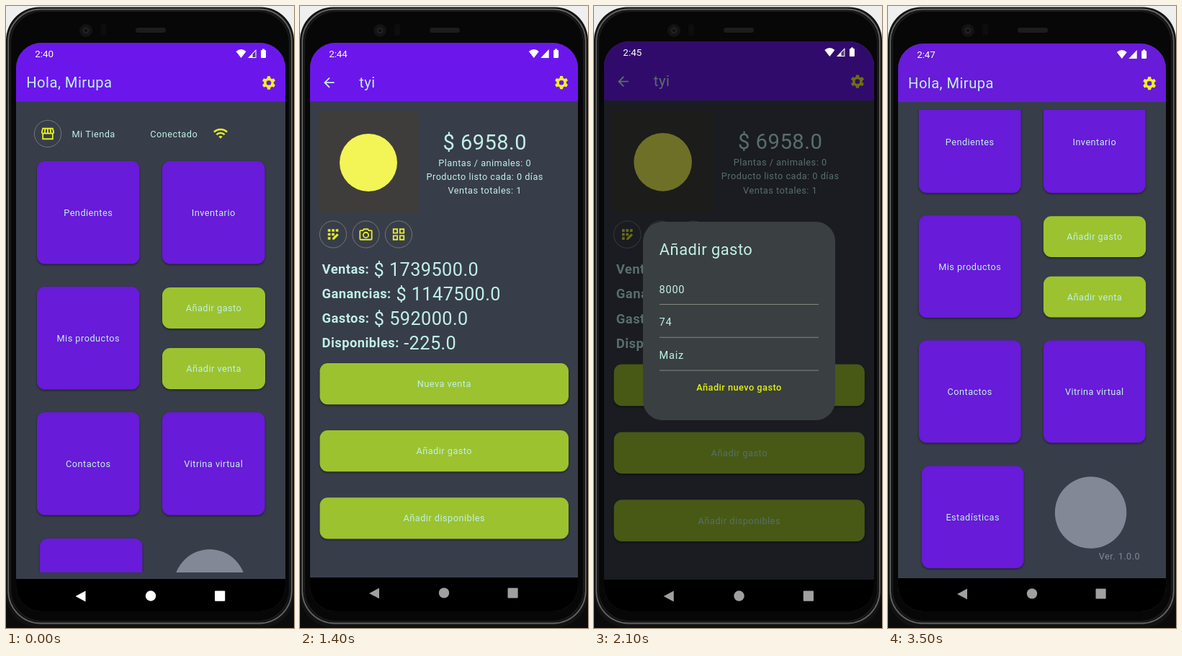
An HTML page with a canvas for the animation above (4.2 s loop, 400x862 px).

```html
<!DOCTYPE html>
<html lang="es">
<head>
<meta charset="utf-8">
<title>App de granja</title>
<style>
  html, body { margin: 0; width: 100%; height: 100%; overflow: hidden; background: #efefef; }
  canvas { display: block; width: 400px; height: 862px; }
</style>
</head>
<body>
<canvas id="stage"></canvas>
<script>
const W = 400, H = 862, HOLD = 700;
const canvas = document.getElementById('stage');
const ctx = canvas.getContext('2d');
const ratio = window.devicePixelRatio || 1;
canvas.width = W * ratio;
canvas.height = H * ratio;

const BG = '#383d4a', PURPLE = '#681bd8', BAR = '#6b17ec', GREEN = '#9cc22f', FAB = '#a3cb34';
const MINT = '#c0f1e6', YELLOW = '#e6ee22', INK = '#1d1f14', RING = '#78776d', DIALOG = '#3a3f42', FADED = '#828896';

// Icons on a 24-unit grid
const ICONS = {
  wifi: 'M1 9l2 2c4.97-4.97 13.03-4.97 18 0l2-2C16.93 2.93 7.08 2.93 1 9zm8 8l3 3 3-3c-1.65-1.66-4.34-1.66-6 0zm-4-4l2 2c2.76-2.76 7.24-2.76 10 0l2-2C15.14 9.14 8.87 9.14 5 13z',
  check: 'M9 16.17L4.83 12l-1.42 1.41L9 19 21 7l-1.41-1.41z',
  back: 'M20 11H7.83l5.59-5.59L12 4l-8 8 8 8 1.41-1.41L7.83 13H20z',
  plus: 'M19 13h-6v6h-2v-6H5v-2h6V5h2v6h6z',
  phone: 'M6.6 10.8c1.4 2.8 3.8 5.1 6.6 6.6l2.2-2.2c.3-.3.7-.4 1-.2 1.1.4 2.3.6 3.6.6a1 1 0 0 1 1 1V20a1 1 0 0 1-1 1A17 17 0 0 1 3 4a1 1 0 0 1 1-1h3.5a1 1 0 0 1 1 1c0 1.2.2 2.4.6 3.6.1.3 0 .7-.3 1z',
  smallPlus: 'M17 2h2v3h3v2h-3v3h-2V7h-3V5h3z',
  edit: 'M3 17.25V21h3.75L17.8 9.94l-3.75-3.75zM20.7 7a1 1 0 0 0 0-1.4l-2.3-2.3a1 1 0 0 0-1.4 0l-1.9 1.8 3.75 3.75z',
  trash: 'M6 19a2 2 0 0 0 2 2h8a2 2 0 0 0 2-2V7H6zM19 4h-3.5l-1-1h-5l-1 1H5v2h14z',
  register: 'M4 4h4v4H4zm6 0h4v4h-4zm6 0h4v4h-4zM4 10h4v4H4zm6 0h4v4h-4zM4 16h4v4H4zM11 17.5V20h2.5l7-7-2.5-2.5z'
};
const LINE_ICONS = {
  store: 'M4.5 4h15L21 9.5a2.2 2.2 0 0 1-4.5 0a2.2 2.2 0 0 1-4.5 0a2.2 2.2 0 0 1-4.5 0a2.2 2.2 0 0 1-4.5 0zM12 4v5.5M8.2 4l-.7 5.5M15.8 4l.7 5.5M4.5 12v8h15v-8',
  camera: 'M4 6h3.5L9 4h6l1.5 2H20a1 1 0 0 1 1 1v12a1 1 0 0 1-1 1H4a1 1 0 0 1-1-1V7a1 1 0 0 1 1-1zM16 13a4 4 0 1 1-8 0a4 4 0 1 1 8 0z',
  squares: 'M4 4h6v6H4zm10 0h6v6h-6zM4 14h6v6H4zm10 0h6v6h-6z'
};

function box(x, y, w, h, r, fill, shadow) {
  ctx.save();
  if (shadow) {
    ctx.shadowColor = 'rgba(0,0,0,.45)';
    ctx.shadowBlur = 3 * ratio;
    ctx.shadowOffsetY = 1.5 * ratio;
  }
  ctx.fillStyle = fill;
  ctx.beginPath();
  ctx.roundRect(x, y, w, h, r);
  ctx.fill();
  ctx.restore();
}

function outline(x, y, w, h, r, color, width) {
  ctx.strokeStyle = color;
  ctx.lineWidth = width;
  ctx.beginPath();
  ctx.roundRect(x, y, w, h, r);
  ctx.stroke();
}

function disc(x, y, r, fill) {
  ctx.fillStyle = fill;
  ctx.beginPath();
  ctx.arc(x, y, r, 0, 7);
  ctx.fill();
}

function poly(fill, ...points) {
  ctx.beginPath();
  points.forEach(([x, y]) => ctx.lineTo(x, y));
  ctx.closePath();
  ctx.fillStyle = fill;
  ctx.fill();
}

function text(str, x, y, { size = 12.74, color = MINT, weight = 400, align = 'left', gap = 0.48 } = {}) {
  ctx.font = `${weight} ${size}px Roboto, sans-serif`;
  ctx.letterSpacing = gap + 'px';
  ctx.textAlign = align;
  ctx.fillStyle = color;
  ctx.fillText(str, x, y);
}

const centered = (str, x, y, opts) => text(str, x, y, { ...opts, align: 'center' });

function icon(name, x, y, color, size = 21.8) {
  ctx.save();
  ctx.translate(x - size / 2, y - size / 2);
  ctx.scale(size / 24, size / 24);
  if (LINE_ICONS[name]) {
    ctx.strokeStyle = color;
    ctx.lineWidth = 2;
    ctx.stroke(new Path2D(LINE_ICONS[name]));
  } else {
    ctx.fillStyle = color;
    ctx.fill(new Path2D(ICONS[name]));
  }
  ctx.restore();
}

function gear(x, y) {
  ctx.beginPath();
  for (let i = 0; i < 6; i++) {
    const mid = (i - 1.5) * Math.PI / 3;
    for (const [turn, r] of [[-.36, 6.9], [-.21, 9.4], [.21, 9.4], [.36, 6.9]]) {
      ctx.lineTo(x + r * Math.cos(mid + turn), y + r * Math.sin(mid + turn));
    }
  }
  ctx.closePath();
  ctx.moveTo(x + 3.3, y);
  ctx.arc(x, y, 3.3, 0, Math.PI * 2, true);
  ctx.fillStyle = '#eff02a';
  ctx.fill('evenodd');
}

function ringIcon(name, x, y) {
  outline(x - 18.6, y - 18.6, 37.2, 37.2, 18.6, RING, 1);
  icon(name, x, y, YELLOW);
}

function button(label, x, y, w, h, fill) {
  box(x, y, w, h, 11, fill, true);
  centered(label, x + w / 2, y + h / 2 + 4.5);
}

function phone() {
  ctx.fillStyle = '#efefef';
  ctx.fillRect(0, 0, W, H);
  ctx.fillStyle = '#0b0b0b';
  ctx.fillRect(0, H / 2, W, H / 2);
  box(0, 1.5, 400, 860, 46, '#121212');
  outline(3.2, 4.5, 393.6, 851, 45, '#626262', 1.8);
  outline(6.5, 7.5, 387, 845, 43, '#1c1c1c', 1.5);
  box(7, 8, 386, 844, 43, '#070707');
  disc(111, 34, 9, '#131313');
  disc(111, 34, 4.5, '#212123');
  disc(111, 34, 2, '#0c0c0e');
  box(131, 25, 8, 16, 3, '#0d0d0d');
  box(180, 30, 42, 7, 3.5, '#1c1c1c');
}

function statusBar({ time, weak }) {
  const white = '#fff';
  text(time, 40.3, 71, { size: 13.4, color: white, gap: 0 });
  ctx.fillStyle = white;
  ctx.beginPath();
  ctx.moveTo(326.5, 72);
  ctx.lineTo(319.5, 63);
  ctx.quadraticCurveTo(326.5, 57, 333.5, 63);
  ctx.fill();
  poly(white, [336, 72], [347.5, 72], [347.5, 60]);
  if (weak) poly('rgba(60,40,110,.9)', [342.5, 71], [346.5, 71], [346.5, 62.5], [342.5, 66.8]);
  box(354, 61, 7, 11, 1, white);
  box(356, 59.5, 3, 2, 0, white);
}

function navBar(color) {
  poly(color, [96.5, 818], [110.5, 810.5], [110.5, 825.5]);
  disc(201, 817.5, 7.2, color);
  box(290, 810.5, 14.2, 14.2, 1, color);
}

function home(scroll) {
  ctx.save();
  ctx.beginPath();
  ctx.rect(14, 143, 374, 642);
  ctx.clip();
  ctx.translate(0, -scroll);
  ringIcon('store', 58, 177);
  text('Mi Tienda', 91.5, 181.5);
  text('Conectado', 200.3, 181.5);
  icon('wifi', 298, 176.5, YELLOW);
  const tile = (label, x, y) => button(label, x, y, 142.5, 142.5, PURPLE);
  tile('Pendientes', 43, 215);
  tile('Inventario', 217, 215);
  tile('Mis productos', 43, 389);
  button('Añadir gasto', 217, 390, 143, 57, GREEN);
  button('Añadir venta', 217, 474, 143, 57, GREEN);
  tile('Contactos', 43, 563);
  tile('Vitrina virtual', 217, 563);
  tile('Estadísticas', 47, 738);
  disc(283, 803, 50, FADED);
  text('Ver. 1.0.0', 294.3, 868.2, { color: FADED });
  ctx.restore();
}

function floatingButton() {
  box(319, 727, 54, 53.5, 15, FAB, true);
}

function tasks() {
  box(89, 84.5, 112, 44.5, [22.2, 0, 0, 22.2], '#e5e5c1');
  outline(89, 84.5, 224, 44.5, 22.2, RING, 1);
  poly(RING, [200.5, 84.5], [201.5, 84.5], [201.5, 129], [200.5, 129]);
  icon('check', 109, 107, INK, 16.4);
  text('Pendiente', 124, 111.5, { weight: 500, color: INK });
  text('Completado', 219.3, 111.5, { weight: 500 });
  ['Comprar concentrado perros', 'Arreglar espacio de patos'].forEach((task, i) => {
    const y = 204 + i * 53.3;
    text(task, 28.6, y + 5, { size: 14.56, gap: 0.78 });
    box(297, y - 19, 68, 38, 19, PURPLE);
    icon('check', 331, y + .5, YELLOW);
  });
  floatingButton();
  icon('plus', 346, 753, INK);
}

function product() {
  ctx.save();
  ctx.translate(14, 51);
  ctx.scale(374 / 372, 374 / 372);
  ctx.translate(-14, -51);
  box(25, 146, 141, 142, 9, '#3e3d3c');
  disc(95, 217, 40, '#f3f455');
  centered('$ 6958.0', 256.7, 198.5, { size: 29 });
  ['Plantas / animales: 0', 'Producto listo cada: 0 días', 'Ventas totales: 1']
    .forEach((line, i) => centered(line, 256.7, 221.5 + i * 19.2, { size: 12.68 }));
  ['register', 'camera', 'squares'].forEach((name, i) => ringIcon(name, 46 + i * 45.5, 316.5));
  [['Ventas:', '$ 1739500.0', 102.6], ['Ganancias:', '$ 1147500.0', 133.4],
   ['Gastos:', '$ 592000.0', 102.8], ['Disponibles:', '-225.0', 144.2]].forEach(([label, value, x], i) => {
    const y = 370.5 + i * 34;
    text(label, 30.6, y, { size: 18.3, weight: 700 });
    text(value, x, y + 3, { size: 25.3, gap: 0.42 });
  });
  ['Nueva venta', 'Añadir gasto', 'Añadir disponibles']
    .forEach((label, i) => button(label, 27.5, 495 + i * 93.1, 345.5, 57.2, GREEN));
  ctx.restore();
}

function contacts() {
  ['Nombre: Olmo Tardeza', 'Nota: Dueño de el granero', 'Ubicación: Boyaca, Colombia',
   'Celular: 100200300', 'Redes sociales: Tuvilor']
    .forEach((line, i) => text(line, 27.9, 161.4 + i * 19.5));
  floatingButton();
  icon('phone', 345, 754, INK, 20);
  icon('smallPlus', 346, 752, INK, 20);
}

function expenseDialog() {
  box(68, 299, 267, 275, 27, DIALOG);
  text('Añadir gasto', 90.8, 345, { size: 21.9 });
  ['8000', '74', 'Maiz'].forEach((value, i) => {
    const y = 397.5 + i * 45.8;
    text(value, 90.5, y, { size: 14.56, gap: 0.78 });
    box(91, y + 15.5, 221, 1, 0, '#83877f');
  });
  centered('Añadir nuevo gasto', 201.5, 533, { weight: 500, color: '#e2f200' });
}

function contactDialog() {
  box(53, 343, 296.5, 185, 26, DIALOG);
  text('Olmo Tardeza', 75.5, 371.5);
  [['phone', 'Llamar', 127, 127], ['edit', 'Editar', 201, 197], ['trash', 'Eliminar', 275, 271]]
    .forEach(([name, label, iconX, labelX]) => {
      icon(name, iconX, 422, YELLOW);
      centered(label, labelX + .3, 480, { weight: 500, color: '#dcea1c' });
    });
}

const GREET = 'Hola, Mirupa', WHITE = '#fff', GREY = '#a0a0a0';
const scenes = [
  { time: '2:40', left: 14, right: 388, top: 51, nav: 794, bar: BAR, title: GREET, gear: true, weak: true, navColor: WHITE, body: () => home(0) },
  { time: '2:42', left: 14, right: 388, top: 51, nav: 795, navColor: WHITE, body: tasks },
  { time: '2:44', left: 14, right: 386, top: 51, nav: 792, bar: BAR, title: 'tyi', back: true, gear: true, navColor: GREY, body: product },
  { time: '2:45', left: 14, right: 389, top: 49, nav: 795, bar: BAR, title: 'tyi', back: true, gear: true, weak: true, navColor: GREY, body: product, dialog: expenseDialog },
  { time: '2:46', left: 15, right: 387, top: 51, nav: 792, bar: BAR, title: 'Contactos', back: true, navColor: GREY, body: contacts, dialog: contactDialog },
  { time: '2:47', left: 14, right: 386, top: 52, nav: 793, bar: PURPLE, title: GREET, gear: true, navColor: GREY, body: () => home(98.4) }
];

// Runs draw in the shared 374-wide screen layout
function inScreen({ left, right, top }, draw) {
  const scale = (right - left) / 374;
  ctx.save();
  ctx.translate(left, top);
  ctx.scale(scale, scale);
  ctx.translate(-14, -51);
  draw();
  ctx.restore();
}

function drawScene(scene) {
  const { left, right, top, nav } = scene;
  phone();
  ctx.save();
  ctx.beginPath();
  ctx.roundRect(left, top, right - left, 839 - top, 35);
  ctx.clip();
  ctx.fillStyle = BG;
  ctx.fillRect(0, 0, W, H);
  inScreen(scene, () => {
    if (scene.bar) box(10, 45, 382, 87.5, 0, scene.bar);
    if (scene.back) icon('back', 40.5, 106.5, MINT);
    if (scene.title) text(scene.title, scene.back ? 82.6 : 28.2, 113, { size: 20.2 });
    if (scene.gear) gear(365, 106.5);
    scene.body();
  });
  if (scene.dialog) {
    ctx.fillStyle = 'rgba(0,0,0,.54)';
    ctx.fillRect(0, 0, W, H);
    scene.dialog();
  }
  ctx.fillStyle = '#000';
  ctx.fillRect(0, nav, W, H - nav);
  inScreen(scene, () => {
    statusBar(scene);
    navBar(scene.navColor);
  });
  ctx.restore();
}

function tick() {
  const index = Math.floor(performance.now() / HOLD) % scenes.length;
  ctx.setTransform(ratio, 0, 0, ratio, 0, 0);
  drawScene(scenes[index]);
  requestAnimationFrame(tick);
}
tick();
</script>
</body>
</html>
```
